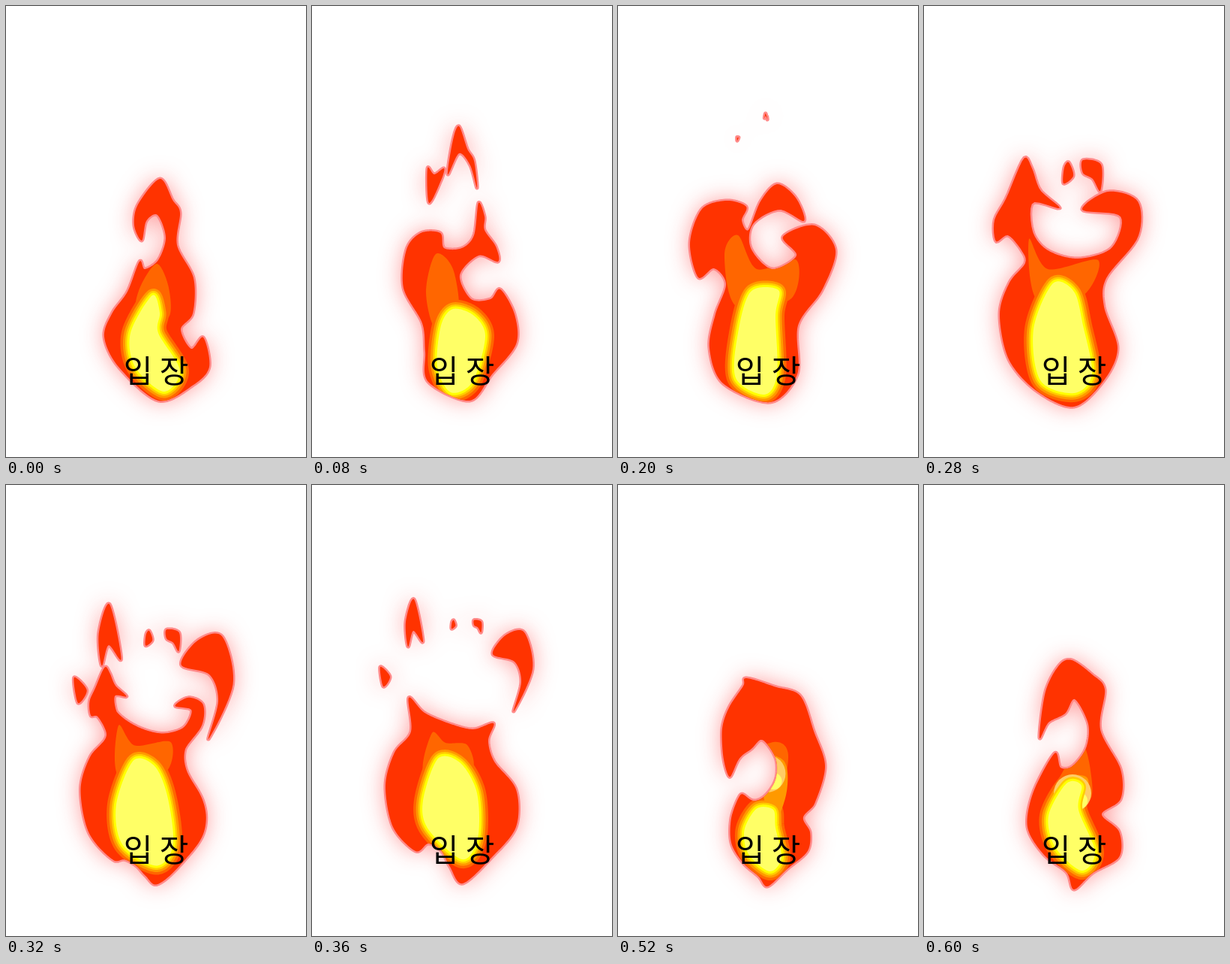
Write an HTML page with a canvas that moves like this. It is 400x600 px and loops after 640 ms.

```html
<!DOCTYPE html>
<html lang="ko">
<head>
<meta charset="utf-8">
<title>입 장</title>
<style>
html, body { margin: 0; width: 100%; height: 100%; overflow: hidden; background: #fff; }
canvas { display: block; }
</style>
</head>
<body>
<canvas id="stage" width="400" height="600"></canvas>
<script>
const ctx = document.getElementById('stage').getContext('2d');
const LOOP = 640, STEP = 40;

// Outlines run clockwise from the bottom tip as x, y pairs.
const slim = [203,525, 150,480, 131,440, 142,408, 162,380, 178,340, 185,350, 203,338, 213,308, 202,278, 187,286,
  181,312, 171,292, 176,264, 205,230, 222,258, 232,275, 228,318, 250,362, 249,409, 233,430, 247,456, 263,441,
  271,480, 250,504];
const hooked = [210,525, 155,500, 151,460, 147,422, 122,375, 126,324, 145,302, 171,302, 176,322, 200,322, 216,305,
  222,262, 230,280, 230,298, 245,320, 248,340, 222,332, 197,358, 212,390, 238,390, 251,377, 270,410, 272,450, 240,490];
const curled = [203,527, 140,502, 122,455, 130,410, 144,370, 128,349, 107,361, 96,315, 112,270, 145,259, 171,267,
  165,285, 174,298, 190,260, 212,237, 237,255, 248,286, 215,271, 180,290, 177,322, 205,350, 238,332, 220,307,
  262,292, 290,325, 272,378, 240,425, 239,490];
const armed = [200,533, 150,512, 113,470, 101,410, 114,368, 135,342, 130,325, 112,305, 96,313, 94,285, 110,255,
  133,203, 144,216, 155,245, 181,269, 145,262, 145,300, 165,325, 205,336, 250,322, 262,280, 211,271, 245,247,
  285,260, 285,308, 243,362, 240,400, 258,455, 240,498];
const squat = [201,530, 184,508, 172,486, 155,477, 138,487, 108,455, 98,400, 110,356, 132,328, 129,283, 150,303,
  185,318, 215,325, 242,317, 235,340, 243,368, 272,405, 272,455, 240,495];
const notched = [198,530, 170,508, 152,468, 185,462, 205,437, 203,410, 183,393, 160,405, 143,440, 122,410, 114,375,
  122,343, 148,300, 144,281, 195,285, 245,289, 287,330, 290,370, 262,430, 245,480];
const tall = [200,538, 190,515, 160,492, 138,455, 146,408, 174,357, 182,376, 198,374, 216,350, 219,318, 201,285,
  188,304, 166,316, 154,336, 162,275, 180,240, 197,233, 224,252, 241,272, 235,325, 262,378, 262,418, 237,438,
  260,461, 260,495, 225,516];

// "from" and "to" pair the points of the previous outline with those of this one.
const body = [
  { t: 0, pts: slim },
  { t: 80, pts: hooked, from: [0, 5, 8, 14, 17, 19, 22], to: [0, 7, 10, 11, 13, 15, 20] },
  { t: 200, pts: curled, from: [0, 3, 5, 7, 8, 11, 15, 20], to: [0, 4, 8, 10, 11, 14, 16, 22] },
  { t: 280, pts: armed, from: [0, 4, 6, 10, 18, 22, 25], to: [0, 5, 8, 14, 15, 21, 25] },
  { t: 360, pts: squat, from: [0, 1, 5, 16, 18, 25], to: [0, 4, 8, 10, 12, 14] },
  { t: 440, pts: notched, from: [0, 1, 4, 9, 13, 16], to: [0, 2, 8, 13, 15, 17] },
  { t: 600, pts: tall, from: [0, 2, 6, 8, 13, 16, 18, 19], to: [0, 5, 10, 13, 16, 19, 21, 24] }
];

const tongue = [
  { t: 0, pts: [175,410, 178,376, 201,343, 217,375, 216,415] },
  { t: 80, pts: [165,430, 152,380, 165,330, 188,350, 195,410] },
  { t: 200, pts: [158,400, 142,330, 160,305, 185,350, 238,338, 230,390] },
  { t: 280, pts: [150,390, 140,310, 165,350, 232,338, 212,385] },
  { t: 360, pts: [150,385, 160,330, 178,343, 207,346, 212,380] },
  { t: 440, pts: [149,398, 168,320, 215,320, 241,368, 215,460, 207,425, 190,376] },
  { t: 600, pts: [172,412, 183,385, 210,345, 222,380, 220,420] }
];

const core = [
  { t: 0, pts: [210,513, 172,480, 166,435, 195,385, 205,408, 203,435, 232,485] },
  { t: 80, pts: [185,514, 167,480, 172,425, 188,403, 216,412, 231,440, 214,500] },
  { t: 200, pts: [195,517, 157,495, 160,435, 177,380, 214,378, 210,412, 212,490] },
  { t: 280, pts: [200,515, 155,498, 146,430, 172,369, 200,380, 212,425, 224,490] },
  { t: 360, pts: [200,498, 155,458, 148,420, 168,364, 198,370, 220,410, 221,470] },
  { t: 440, pts: [194,515, 173,500, 171,478, 180,464, 204,464, 214,480, 208,504] },
  { t: 600, pts: [210,513, 175,482, 166,440, 190,397, 210,400, 206,432, 228,488] }
];

const amber = [
  { t: 360, pts: [150,395, 165,355, 205,370, 220,415, 190,470, 160,420] },
  { t: 440, pts: [165,375, 178,330, 225,345, 233,400, 200,470, 208,400] },
  { t: 600, pts: [175,410, 190,388, 218,390, 215,425, 200,470, 180,430] }
];

// Centre of the hot spot that leaves the core and returns to it
const spot = [
  { t: 360, pts: [175,390] },
  { t: 440, pts: [199,358] },
  { t: 600, pts: [198,410] }
];

// Torn-off pieces: time of full size, life after it, outline
const sparks = [
  [80, 120, [181,224, 188,178, 196,160, 207,190, 216,206, 220,242, 211,212, 196,196]],
  [80, 120, [156,262, 154,216, 163,224, 176,216, 172,232]],
  [280, 80, [186,236, 187,215, 193,208, 199,226]],
  [280, 80, [212,222, 212,205, 236,211, 235,246, 225,230]],
  [360, 80, [128,215, 125,182, 136,152, 148,208, 135,194]],
  [360, 80, [95,268, 91,242, 104,255]],
  [360, 40, [241,225, 258,200, 283,196, 294,245, 269,301, 279,262, 270,235]],
  [440, 40, [278,160, 287,144, 291,170, 288,188]],
  [440, 40, [296,236, 290,215, 299,202, 300,220]]
];

const mix = (a, b, k) => a + (b - a) * k;

// Point on the closed smooth curve; s counts in outline points
function curveAt(pts, s) {
  const n = pts.length, i = Math.floor(s), u = s - i;
  return [0, 1].map(d => {
    const [p, a, b, q] = [-1, 0, 1, 2].map(o => pts[(2 * (i + o) + d + n) % n]);
    const m = (b - p) * .46, w = (q - a) * .46;
    return a + u * (m + u * (3 * (b - a) - 2 * m - w + u * (m + w - 2 * (b - a))));
  });
}

function span(keys, t) {
  const i = Math.max(1, keys.findIndex(k => k.t > t));
  const end = t >= keys.at(-1).t ? keys.length - 1 : i;
  const a = keys[end - 1], b = keys[end];
  return [a, b, (t - a.t) / (b.t - a.t)];
}

function line(path, points) {
  points.forEach(([x, y], i) => i ? path.lineTo(x, y) : path.moveTo(x, y));
  path.closePath();
}

function morph(path, keys, t) {
  const [a, b, k] = span(keys, t), points = [];
  const from = [...(b.from || [0]), a.pts.length / 2];
  const to = [...(b.to || [0]), b.pts.length / 2];
  const steps = b.from ? 60 : 120;
  for (let i = 0; i < from.length - 1; i++) {
    for (let j = 0; j < steps; j++) {
      const p = curveAt(a.pts, mix(from[i], from[i + 1], j / steps));
      const q = curveAt(b.pts, mix(to[i], to[i + 1], j / steps));
      points.push([mix(p[0], q[0], k), mix(p[1], q[1], k)]);
    }
  }
  line(path, points);
  return path;
}

// Pieces shrink while they rise
function addSparks(path, t) {
  for (const [peak, life, pts] of sparks) {
    const age = (t - peak) / 80;
    if (age < -.5 || t > peak + life) continue;
    const scale = Math.max(.1, 1 - .6 * age), n = pts.length / 2;
    const mid = [0, 1].map(d => pts.reduce((sum, v, i) => i % 2 === d ? sum + v / n : sum, 0));
    const points = Array.from({ length: n * 12 }, (_, i) => {
      const [x, y] = curveAt(pts, i / 12);
      return [mix(mid[0], x, scale) - 3 * age, mix(mid[1], y, scale) - 36 * age];
    });
    line(path, points);
  }
}

function fill(path, color) {
  ctx.fillStyle = color;
  ctx.fill(path);
}

function stroke(path, color, width) {
  ctx.strokeStyle = color;
  ctx.lineWidth = width;
  ctx.stroke(path);
}

function disc(x, y, r, color) {
  const path = new Path2D();
  path.arc(x, y, r, 0, 7);
  fill(path, color);
}

function draw(t) {
  ctx.fillStyle = '#fff';
  ctx.fillRect(0, 0, 400, 600);
  ctx.lineJoin = 'round';

  const flame = morph(new Path2D(), body, t);
  addSparks(flame, t);
  ctx.save();
  ctx.shadowColor = 'rgba(255,40,40,.5)';
  ctx.shadowBlur = 30;
  fill(flame, '#f30');
  ctx.restore();
  stroke(flame, '#ff8a8a', 5);
  fill(flame, '#f30');

  ctx.save();
  ctx.clip(flame);
  const heart = morph(new Path2D(), core, t);
  fill(morph(new Path2D(), tongue, t), '#f60');
  stroke(heart, '#f60', 24);
  stroke(heart, '#f90', 17);
  if (t > 360) {
    fill(morph(new Path2D(), amber, t), '#f90');
    const [a, b, k] = span(spot, t);
    const x = mix(a.pts[0], b.pts[0], k), y = mix(a.pts[1], b.pts[1], k);
    disc(x, y, 25, '#fc6');
    disc(x + 9, y + 10, 11, '#ff6');
  }
  stroke(heart, '#fc0', 11);
  stroke(heart, '#ff0', 6);
  fill(heart, '#ff6');
  ctx.restore();

  ctx.fillStyle = '#000';
  ctx.font = '500 42px "Noto Sans CJK KR", "Noto Sans CJK", sans-serif';
  ctx.textAlign = 'center';
  ctx.fillText('입 장', 200, 501);
}

function tick(now) {
  draw(Math.floor(now % LOOP / STEP) * STEP);
  requestAnimationFrame(tick);
}
draw(0);
requestAnimationFrame(tick);
</script>
</body>
</html>
```
